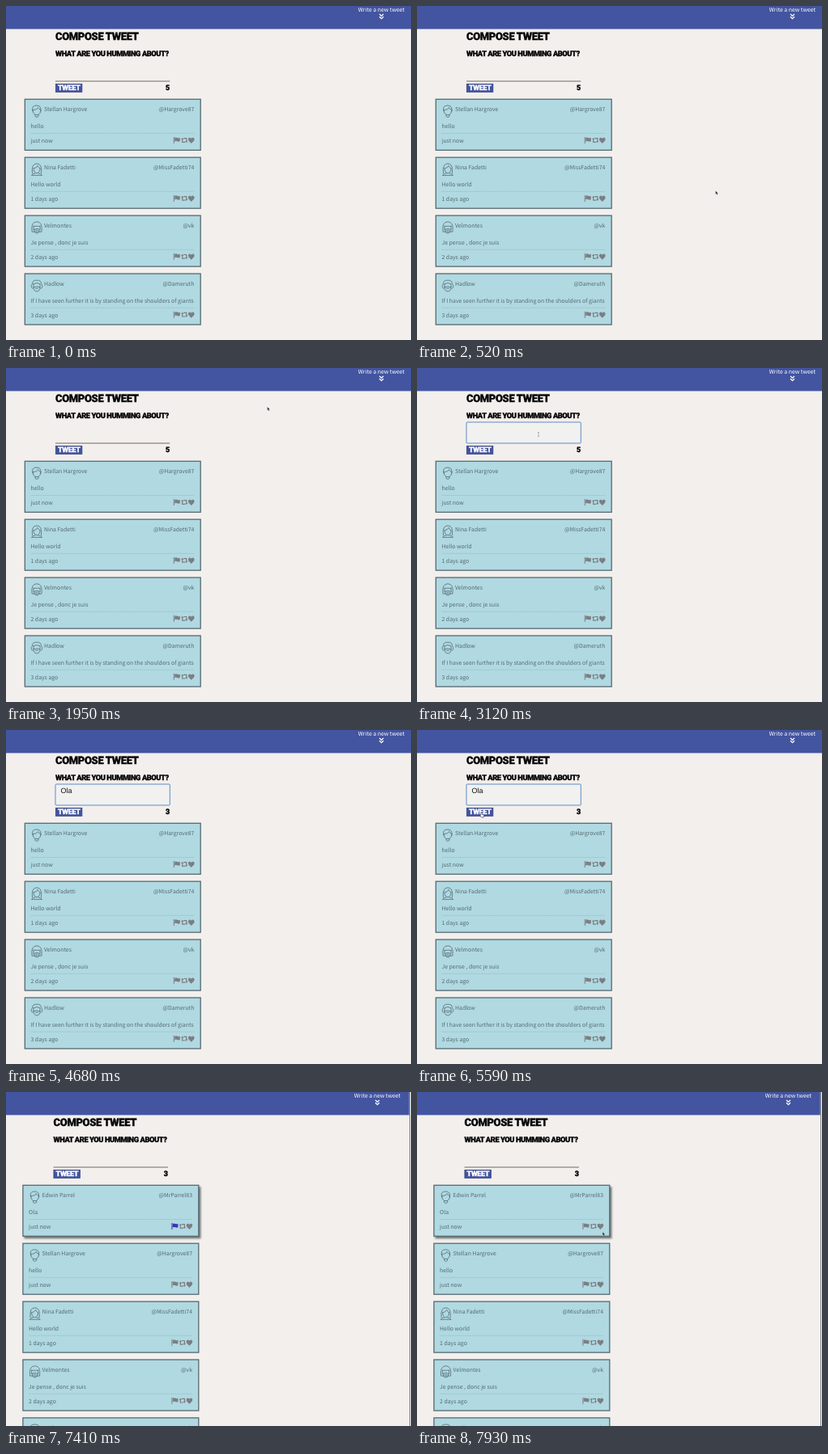
An HTML page for the animation above (8 s loop, 500 by 413 pixels).

```html
<!DOCTYPE html>
<html lang="en">
<head>
<meta charset="utf-8">
<title>Compose tweet</title>
<style>
  html, body { margin: 0; width: 100%; height: 100%; overflow: hidden; background: #f2efed; }
  svg { display: block; width: 100vw; height: 100vh; }
  text { text-rendering: geometricPrecision; white-space: pre; }
  .body { font: 300 6.9px "Noto Sans CJK JP", "Noto Sans CJK SC", "Noto Sans", sans-serif; }
  .card text { fill: #566a70; }
  .loud { font-family: Roboto, Inter, sans-serif; font-weight: 900; stroke-width: .3; }
  .typed { font: 9px "Liberation Sans", Arial, sans-serif; }
  .line { fill: none; stroke: #566b71; stroke-width: .8; stroke-linejoin: round; stroke-linecap: round; }
</style>
</head>
<body>
<svg id="stage" viewBox="0 0 500 413" preserveAspectRatio="none"></svg>
<script>
const LOOP = 8000, STEP = 130;
const FOCUS = 2600, POST = 5980;
const KEYS = [3380, 3770, 3900];
const stage = document.getElementById("stage");

const faces = {
  man: "M2 8Q0 1.5 6 1Q13 .5 12 8M2 6.5Q7.500 6.500 8.500 3.500Q9.500 6 12 6.500M2 7Q2 10.500 5 12.500H9Q12 10.500 12 7M5 12.500V14.500Q7 16.500 9 14.500V12.500",
  woman: "M1.5 13Q0 1 7 1Q14 1 12.500 13M3 7Q7 6.500 8 3.500Q9 6 11 7M3 7Q3 12.500 7 12.800Q11 12.500 11 7M.5 15.500Q2 13 5 13M13.500 15.500Q12 13 9 13M1 15.500H13",
  scholar: "M1 13Q-.5 1 7 1Q14.500 1 13 13ZM3 6.500H11M3 6.500V11M11 6.500V11M4 10.500Q7 8.500 10 10.500Q10.500 15.200 7 15.200Q3.500 15.200 4 10.500M6 11.500H8",
  elder: "M2 12Q-1.500 9 1.500 6Q1.500 1 7 1.500Q12.500 1 12.500 6Q15.500 9 12 12M3 6Q7 3.500 11 6V10M3 6V10M3 10Q7 8.500 11 10Q11 15 7 15.200Q3 15 3 10M5.500 11.500H8.500"
};

const posts = [
  { name: "Edwin Parrel", handle: "@MrParrel83", say: "Ola", when: "just now", face: "man" },
  { name: "Stellan Hargrove", handle: "@Hargrove87", say: "hello", when: "just now", face: "man" },
  { name: "Nina Fadetti", handle: "@MissFadetti74", say: "Hello world", when: "1 days ago", face: "woman" },
  { name: "Velmontes", handle: "@vk", say: "Je pense , donc je suis", when: "2 days ago", face: "scholar" },
  { name: "Hadlow", handle: "@Dameruth", say: "If I have seen further it is by standing on the shoulders of giants", when: "3 days ago", face: "elder" }
];

// Pointer stops: time, x, y, shape
const route = [
  [0, 285, 425, "arrow"], [130, 285, 425, "arrow"], [910, 452, 32, "arrow"],
  [1040, 461, 14, "hand"], [1560, 462, 14, "hand"], [1820, 440, 24, "arrow"],
  [2080, 205, 72, "arrow"], [2210, 150, 82, "beam"], [3380, 150, 82, "none"],
  [4680, 150, 82, "none"], [4810, 130, 87, "beam"], [5200, 79, 101, "hand"],
  [5590, 79, 102, "hand"], [5980, 92, 110, "arrow"], [6240, 111, 122, "arrow"],
  [6760, 188, 154, "arrow"], [7150, 207, 165, "none"], [7410, 208, 166, "none"],
  [7540, 217, 166, "arrow"], [7670, 225, 167, "arrow"], [7800, 228, 171, "arrow"],
  [7930, 229, 173, "arrow"], [LOOP, 229, 173, "arrow"]
];

const pointers = {
  arrow: `<path d="M0 0L.2 4.500 1.200 3.600 2 5.200 2.800 4.800 2 3.300H3.400Z" fill="#202430" stroke="#fff" stroke-width=".25"/>`,
  hand: `<path d="M0 0Q1 -.6 1.300 .7V2.200L3.700 2.800 3.200 6H.4L-1.500 3.300 -.3 3.200Z" fill="#fff" stroke="#252a48" stroke-width=".6"/>`,
  beam: `<path d="M-1 -2.500H1M0 -2.500V2.500M-1 2.500H1" fill="none" stroke="#8b8d90" stroke-width=".6"/>`,
  none: ""
};

const at = (x, y, inner) => `<g transform="translate(${x} ${y})">${inner}</g>`;
const rect = (x, y, w, h, rest) => `<rect x="${x}" y="${y}" width="${w}" height="${h}" ${rest}/>`;
const text = (x, y, s, rest = "") => `<text x="${x}" y="${y}" ${rest}>${s}</text>`;
const loud = (x, y, s, size, gap, color = "#000", rest = "") =>
  text(x, y, s, `class="loud" font-size="${size}" letter-spacing="${gap}" fill="${color}" stroke="${color}" ${rest}`);

function pointerAt(t) {
  let i = 0;
  while (i < route.length - 2 && route[i + 1][0] <= t) i++;
  const [t0, x0, y0, shape] = route[i], [t1, x1, y1] = route[i + 1];
  const k = (t - t0) / (t1 - t0);
  return { x: x0 + (x1 - x0) * k, y: y0 + (y1 - y0) * k, shape };
}

function icons(hot) {
  const tint = i => i === hot ? "#3a32bd" : "#7c7e82";
  return at(206.8, 162, `<path fill="${tint(0)}" d="M0 0H1V8H0ZM1.400 .9Q3 0 4.600 .9T8 .8V5.300Q6.300 6.200 4.600 5.300T1.400 5.500Z"/>`) +
    at(216, 162.5, `<path fill="none" stroke="${tint(1)}" stroke-width="1.200" d="M1.700 2V5.800H5.300M6.800 5V1.200H3.200"/>
      <path fill="${tint(1)}" d="M0 2.600L1.700 .4 3.400 2.600ZM5.100 4.400L6.800 6.600 8.500 4.400Z"/>`) +
    at(224.8, 162.6, `<path fill="${tint(2)}" d="M4 7.400L.6 3.900Q-.6 1.700 1 .4 2.800 -.5 4 1.300 5.200 -.5 7 .4 8.600 1.700 7.400 3.900Z"/>`);
}

function card(p, i, hover, hot) {
  return `<g class="card body" transform="translate(0 ${i * 71.9})">` +
    (hover ? rect(24.8, 117.2, 218, 64, `fill="#4f5459" opacity=".8" filter="url(#soft)"`) : "") +
    rect(23.3, 115.3, 216.9, 63, `fill="#b0d9e2" stroke="#586a70" stroke-width="1.300"`) +
    at(31, 122, `<path class="line" d="${faces[p.face]}"/>`) +
    text(47, 130, p.name) +
    text(232.4, 130, p.handle, `text-anchor="end"`) +
    text(30.5, 151.2, p.say) +
    `<path d="M30.500 157.500H232.500" stroke="#94b3ba" stroke-width=".7" stroke-dasharray="1 .6"/>` +
    text(30.5, 169, p.when) + icons(hot) + `</g>`;
}

function form(t, posted) {
  const typed = KEYS.filter(k => t >= k).length;
  const focused = t >= FOCUS && !posted;
  const box = focused
    ? rect(61, 67, 141.3, 26, `rx="1" fill="#f1f1f0" stroke="#5f8cc4"`) +
      text(67.5, 77.5, "Ola".slice(0, typed), `class="typed" fill="#111"`) +
      (t < 3120 ? `<path d="M67.500 70V79" stroke="#333" stroke-width=".5"/>` : "")
    : `<path d="M61 93H202.300" stroke="#6d6967"/>`;
  return loud(61, 42.4, "COMPOSE TWEET", 13, -.35) +
    loud(61, 62.3, "WHAT ARE YOU HUMMING ABOUT?", 9.3, -.43) + box +
    rect(61.3, 96.3, 32.6, 10.2, `fill="#4354a0" stroke="#343f78" stroke-width=".7"`) +
    loud(64, 104.3, "TWEET", 9, -.4, "#fff") +
    loud(202.3, 103.6, 5 - Math.max(0, typed - 1), 9, 0, "#000", `text-anchor="end"`);
}

function nav(shift) {
  return rect(0, 0, 500, 28.5, `fill="#4354a0"`) +
    at(-shift, 0, text(434.8, 7.2, "Write a new tweet", `class="body" fill="#fff"`) +
      `<path d="M461 10L463.500 12.400 466 10M461 13.200L463.500 15.600 466 13.200" fill="none" stroke="#fff" stroke-width="1.300"/>`);
}

function render(t) {
  const posted = t >= POST;
  const p = pointerAt(t);
  const list = posted ? posts : posts.slice(1);
  const hover = posted && p.y > 115;
  const hot = hover && p.y > 161 && p.y < 170.5 && p.x > 203 ? Math.min(2, Math.floor((p.x - 203) / 9.2)) : -1;
  stage.innerHTML =
    `<defs><filter id="soft"><feGaussianBlur stdDeviation=".9"/></filter></defs>` +
    rect(0, 0, 500, 413, `fill="#f2efed"`) +
    nav(posted ? 5 : 0) +
    at(posted ? -2.4 : 0, 0, form(t, posted) +
      list.map((post, i) => card(post, i, hover && i === 0, i === 0 ? hot : -1)).join("")) +
    (posted ? rect(497.8, 0, 2.2, 413, `fill="#eeeef0"`) + rect(498, 0, 1, 413, `fill="#85868c"`) : "") +
    at(p.x, p.y, pointers[p.shape]);
}

let start, last;
function tick(now) {
  start ??= now;
  const t = Math.floor((now - start) % LOOP / STEP) * STEP;
  if (t !== last) render(last = t);
  requestAnimationFrame(tick);
}
render(0);
requestAnimationFrame(tick);
</script>
</body>
</html>
```
